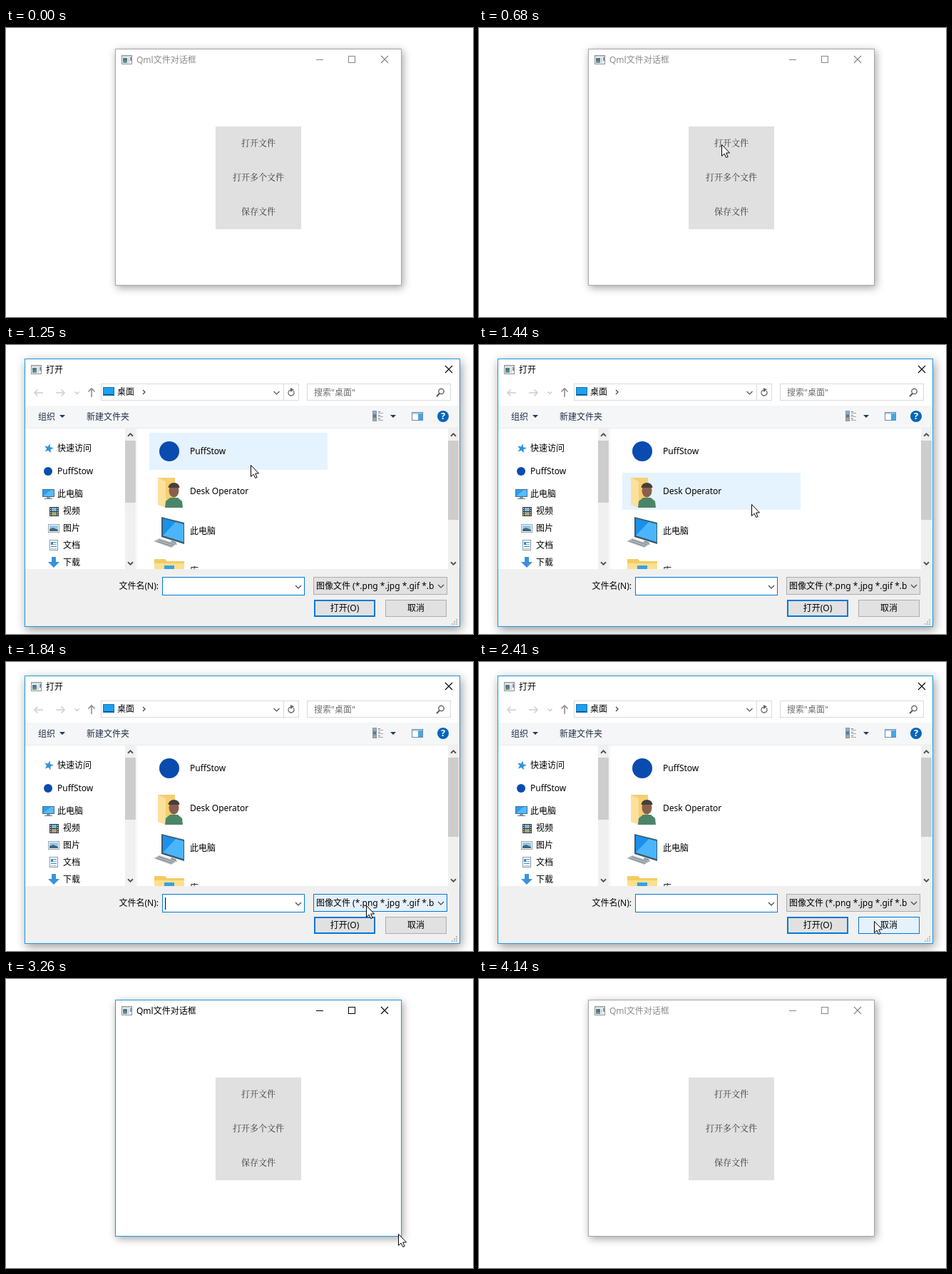
These frames come from a looping animation (655 by 405 pixels, 4190 ms). An HTML page with a canvas:

```html
<!DOCTYPE html>
<html lang="zh-CN">
<head>
<meta charset="utf-8">
<style>
html, body { margin: 0; width: 100%; height: 100%; overflow: hidden; background: #fff; }
canvas { display: block; width: 655px; height: 405px; }
</style>
</head>
<body>
<canvas id="stage"></canvas>
<script>
const W = 655, H = 405, LOOP = 4190;
const UI = "12px 'Noto Sans', 'Noto Sans CJK SC', 'Noto Sans CJK', sans-serif";
const SERIF = "500 12px 'Noto Serif CJK SC', 'Noto Sans CJK SC', 'Noto Sans CJK', serif";
const ACCENT = '#0078d7', BORDER = '#1e9ade';
const CLOUD = 'PuffStow', USER = 'Desk Operator';

const stage = document.getElementById('stage');
const layer = document.createElement('canvas');
const dpr = window.devicePixelRatio || 1;
const setup = c => {
  c.width = W * dpr;
  c.height = H * dpr;
  const ctx = c.getContext('2d');
  ctx.scale(dpr, dpr);
  return ctx;
};
const screen = setup(stage), sheet = setup(layer);
let g = screen;

// start, end, steps, from x, y, to x, y
const moves = [
  [60, 560, 8, 550, 351, 340, 163],
  [750, 750, 1, 339, 162, 339, 162],
  [1250, 1440, 4, 343, 168, 382, 223],
  [1510, 1770, 5, 404, 246, 505, 341],
  [1840, 2360, 8, 505, 341, 552, 362],
  [2410, 2740, 6, 554, 363, 561, 369],
  [3010, 3330, 6, 560, 367, 543, 351]
];

function pointer(t) {
  if (t < 60 || t >= 4140) return null;
  const [a, b, n, x0, y0, x1, y1] = moves.filter(m => m[0] <= t).pop();
  const k = n < 2 ? 0 : Math.min(n - 1, Math.floor((t - a) / (b - a) * (n - 1) + 0.001));
  const p = n < 2 ? 1 : k / (n - 1);
  return { x: Math.round(x0 + (x1 - x0) * p), y: Math.round(y0 + (y1 - y0) * p) };
}

function rect(x, y, w, h, fill) {
  g.fillStyle = fill;
  g.fillRect(x, y, w, h);
}

function box(x, y, w, h, fill, edge, lw = 1) {
  if (fill) rect(x, y, w, h, fill);
  g.strokeStyle = edge;
  g.lineWidth = lw;
  g.strokeRect(x + lw / 2, y + lw / 2, w - lw, h - lw);
}

function path(pts, close) {
  g.beginPath();
  for (let i = 0; i < pts.length; i += 2) g.lineTo(pts[i], pts[i + 1]);
  if (close) g.closePath();
}

function line(pts, color, lw = 1) {
  path(pts);
  g.strokeStyle = color;
  g.lineWidth = lw;
  g.stroke();
}

function poly(pts, fill) {
  path(pts, true);
  g.fillStyle = fill;
  g.fill();
}

function disc(x, y, r, fill) {
  g.beginPath();
  g.arc(x, y, r, 0, 7);
  g.fillStyle = fill;
  g.fill();
}

function text(s, x, cy, color = '#000', align = 'left', font = UI) {
  g.font = font;
  g.textAlign = align;
  g.fillStyle = color;
  g.fillText(s, x, cy + 4.3);
}

function cross(x, y, color) {
  line([x - 5, y - 5, x + 5, y + 5], color, 1.1);
  line([x - 5, y + 5, x + 5, y - 5], color, 1.1);
}

// d = 1 points down, -1 points up
function chevron(x, y, d, color = '#444', r = 4, lw = 1.2) {
  line([x - r, y - d * r / 2, x, y + d * r / 2, x + r, y - d * r / 2], color, lw);
}

function arrow(x, y, dx, dy, color) {
  const a = 6, b = 4.5;
  line([x - dx * a, y - dy * a, x + dx * a, y + dy * a], color, 1.6);
  line([x + dx * 1.5 - dy * b, y + dy * 1.5 - dx * b, x + dx * a, y + dy * a,
    x + dx * 1.5 + dy * b, y + dy * 1.5 + dx * b], color, 1.6);
}

function frame(x, y, w, h, edge, blur, dy, shade) {
  g.save();
  g.shadowColor = `rgba(0,0,0,${shade})`;
  g.shadowBlur = blur * dpr;
  g.shadowOffsetX = 2 * dpr;
  g.shadowOffsetY = dy * dpr;
  rect(x, y, w, h, '#fff');
  g.restore();
  box(x, y, w, h, '#fff', edge);
}

function appIcon(x, y) {
  box(x, y, 15, 13, '#f4f5f6', '#8b9298');
  rect(x + 1, y + 1, 13, 2, '#d5d9dc');
  rect(x + 2, y + 4, 6, 7, '#53788a');
  rect(x + 2, y + 8, 6, 3, '#6b9280');
  rect(x + 9, y + 4, 2, 7, '#cfd6da');
  rect(x + 12, y + 3, 2, 5, '#7d99ad');
}

function scrollbar(x, w, end) {
  rect(x, 117, w, 197, '#f0f0f0');
  rect(x, 134, w, end - 134, '#cdcdcd');
  chevron(x + w / 2, 126, -1, '#505050', 3.5, 1.8);
  chevron(x + w / 2, 306, 1, '#505050', 3.5, 1.8);
}

function monitor(x, y) {
  box(x, y, 17, 11, '#2b9df0', '#4c6f88');
  poly([x + 1, y + 10, x + 12, y + 1, x + 16, y + 1, x + 16, y + 10], '#55bcff');
  rect(x + 6, y + 11, 5, 2, '#8d9aa3');
  rect(x + 3, y + 13, 11, 1, '#667986');
}

function mainWindow(active, down) {
  const ink = active ? '#000' : '#858585';
  frame(153, 29, 402, 332, active ? BORDER : '#a6a6a6', 11, 3, 0.36);
  appIcon(162, 38);
  text('Qml文件对话框', 183, 44.5, active ? '#000' : '#8c8c8c');
  line([435, 44.5, 445, 44.5], ink);
  box(480, 39, 10, 10, null, ink);
  cross(531, 44, ink);
  rect(294, 138, 120, 144, '#e0e0e0');
  if (down) rect(294, 138, 120, 48, '#d0d0d0');
  ['打开文件', '打开多个文件', '保存文件'].forEach((s, i) =>
    text(s, 354, 162 + i * 48, '#38383a', 'center', SERIF));
}

function navigation(open) {
  arrow(46, 67, -1, 0, '#d0d0d0');
  arrow(76, 67, 1, 0, '#d0d0d0');
  chevron(99.5, 67, 1, '#c4c4c4', 3);
  arrow(120, 67, 0, -1, '#8e8e8e');
  box(133, 54, 278, 24, '#fff', '#d9d9d9');
  line([389.5, 55, 389.5, 77], '#d9d9d9');
  box(136, 59, 16, 12, '#1ca0f2', '#1673b0');
  rect(137, 69, 14, 1, '#0c4c80');
  text('桌面', 156, 66);
  if (open) line([192, 63, 195, 66, 192, 69], '#444', 1.2);
  chevron(379.5, 67, 1, '#555');
  g.beginPath();
  g.arc(400, 67, 4, -0.7, 4.4);
  g.strokeStyle = '#666';
  g.lineWidth = 1.4;
  g.stroke();
  poly([399, 60, 404, 62.5, 399, 66], '#666');
  box(422, 54, 202, 24, '#fff', '#d9d9d9');
  text('搜索"桌面"', 432, 66.5, '#6d6d6d');
  g.beginPath();
  g.arc(610.5, 65, 3.7, 0, 7);
  g.strokeStyle = '#555';
  g.lineWidth = 1.3;
  g.stroke();
  line([608, 68, 604, 72], '#555', 1.8);
}

function toolbar() {
  rect(27, 85, 609, 31, '#f5f6f7');
  rect(27, 116, 609, 1, '#e9ebec');
  text('组织', 45, 100.5, '#1e2f48');
  text('新建文件夹', 113, 100.5, '#1e2f48');
  poly([75, 98, 83, 98, 79, 102], '#1e395b');
  poly([539, 98, 547, 98, 543, 102], '#1e395b');
  for (let i = 0; i < 3; i++) {
    box(514, 92 + i * 5, 6, 5, ['#7fb6df', '#4d78a8', '#b9a481'][i], '#8998a5');
    rect(522, 93 + i * 5, 3, 1, '#777');
    rect(522, 95 + i * 5, 7, 1, '#a4a4a4');
  }
  box(569, 94, 16, 12, '#fff', '#6c8aa6');
  rect(570, 95, 14, 2, '#b9d2e7');
  rect(578, 96, 6, 9, '#48a6e4');
  disc(613, 100, 8, '#0765b8');
  text('?', 613, 100, '#fff', 'center', "bold 13px 'Noto Sans', sans-serif");
}

function star(x, y) {
  const pts = [];
  for (let i = 0; i < 10; i++) {
    const r = i % 2 ? 2.8 : 7, a = i * Math.PI / 5 - 1.35;
    pts.push(x + r * Math.cos(a), y + r * Math.sin(a));
  }
  poly(pts, '#2f94dd');
}

function folderIcons() {
  box(61, 227, 13, 13, '#333', '#333');
  rect(64, 228, 7, 5, '#78b7df');
  rect(64, 234, 7, 5, '#a2a77e');
  for (let i = 0; i < 4; i++) {
    rect(62, 228 + i * 3, 1, 2, '#eee');
    rect(72, 228 + i * 3, 1, 2, '#eee');
  }
  box(59, 251, 16, 12, '#fff', '#98a0a6');
  rect(61, 253, 12, 8, '#8fcaf0');
  poly([61, 261, 61, 258, 66, 256, 73, 259, 73, 261], '#41657a');
  box(61, 273, 12, 15, '#fff', '#8798a5');
  for (let i = 0; i < 4; i++) rect(63, 276 + i * 3, 8, 1, i % 2 ? '#8ab9dc' : '#348bcb');
  rect(63, 276, 3, 4, '#348bcb');
  poly([64, 297, 70, 297, 70, 304, 75, 304, 67, 312, 59, 304, 64, 304], '#3a92dc');
}

function sidebar(open) {
  star(60, 145);
  text('快速访问', 72, 145);
  disc(59, 177, 6, '#0a4bb0');
  text(CLOUD, 72, 177);
  monitor(51, 202);
  text('此电脑', 72, 209);
  if (open) {
    folderIcons();
    ['视频', '图片', '文档', '下载'].forEach((s, i) => text(s, 80, 233 + i * 24));
    scrollbar(167, 15, 221);
    rect(183, 117, 1, 197, '#f0f0f0');
  } else {
    box(55, 234, 12, 9, '#3ba5ee', '#47708e');
    rect(58, 245, 7, 1, '#667986');
    disc(55.5, 242.5, 4.5, '#286fae');
    line([51, 242, 60, 242], '#8fc9ef');
    text('网络', 72, 241);
    rect(185, 117, 1, 197, '#efefef');
  }
}

function userFolder() {
  poly([213, 186, 237, 186, 237, 224, 213, 224], '#f5cf72');
  poly([213, 186, 224, 191, 224, 228, 213, 224], '#fde09a');
  poly([223, 228, 224, 219, 230, 214, 241, 214, 247, 219, 248, 228], '#4b8568');
  g.beginPath();
  g.ellipse(235.5, 204, 7, 9.5, 0, 0, 7);
  g.fillStyle = '#8a604d';
  g.fill();
  g.beginPath();
  g.ellipse(235.5, 200, 8, 7, 0, Math.PI, 0);
  g.fillStyle = '#453f3c';
  g.fill();
}

function bigMonitor() {
  poly([218, 241, 250, 249, 250, 279, 218, 269], '#3f5a6b');
  poly([220, 243, 249, 251, 249, 276, 220, 267], '#1b90ea');
  poly([220, 267, 238, 248, 249, 251, 249, 276], '#4bb5fb');
  poly([232, 274, 238, 276, 240, 280, 230, 278], '#8d9aa2');
  poly([207, 275, 215, 271, 239, 279, 232, 284], '#b7bdc1');
  line([211, 275, 233, 282], '#78838a');
  line([214, 273, 236, 280], '#78838a');
}

function list(pos) {
  if (pos.x >= 201 && pos.x < 451 && pos.y >= 123 && pos.y < 314) {
    const row = Math.floor((pos.y - 123) / 56);
    if (pos.y - 123 - row * 56 < 52) rect(201, 123 + row * 56, 250, 52, '#e5f3ff');
  }
  disc(229, 149, 14, '#0a4bb0');
  userFolder();
  bigMonitor();
  poly([208, 300, 223, 300, 226, 303, 250, 303, 250, 316, 208, 316], '#f4cb63');
  rect(208, 306, 42, 9, '#fde08f');
  rect(222, 309, 14, 6, '#3ba0e2');
  [CLOUD, USER, '此电脑', '库'].forEach((s, i) => text(s, 258, 149 + i * 56));
  scrollbar(620, 15, 245);
}

function button(label, x, edge, lw, fill = '#e1e1e1') {
  box(x, 357, 86, 24, fill, edge, lw);
  text(label, x + 43, 369, '#000', 'center');
}

function footer(t, pos) {
  rect(27, 314, 609, 80, '#f0f0f0');
  text('文件名(N):', 214, 338, '#000', 'right');
  box(219, 325, 200, 26, '#fff', ACCENT);
  chevron(410, 339, 1);
  if (t < 1250 || (t >= 1840 && t < 2360)) rect(223, 330, 1, 17, '#000');

  const overType = pos.x >= 431 && pos.x < 619 && pos.y >= 325 && pos.y < 351;
  box(431, 325, 188, 25, overType ? '#e5f1fb' : '#e1e1e1', overType ? ACCENT : '#adadad');
  g.save();
  g.beginPath();
  g.rect(432, 326, 168, 23);
  g.clip();
  text('图像文件 (*.png *.jpg *.gif *.bmp)', 435, 338);
  g.restore();
  chevron(610, 338, 1);

  const down = t >= 2740;
  const over = pos.x >= 532 && pos.x < 618 && pos.y >= 357 && pos.y < 381;
  button('打开(O)', 432, down ? '#adadad' : ACCENT, down ? 1 : 2);
  if (down) button('取消', 532, '#005499', 1, '#cce4f7');
  else if (over) button('取消', 532, ACCENT, 1, '#e5f1fb');
  else button('取消', 532, '#adadad', 1);
  for (let i = 0; i < 3; i++)
    for (let j = 0; j <= i; j++) rect(631 - j * 3, 384 + i * 3, 2, 2, '#bdbdbd');
}

function dialog(t, pos) {
  const open = t >= 1000;
  frame(26, 19, 611, 376, BORDER, 13, 4, 0.4);
  appIcon(35, 28);
  text('打开', 56, 34.5);
  cross(621, 34, '#000');
  navigation(t >= 870);
  toolbar();
  g.save();
  g.beginPath();
  g.rect(27, 117, 609, 197);
  g.clip();
  sidebar(open);
  list(pos);
  g.restore();
  footer(t, pos);
}

function cursor({ x, y }) {
  g.save();
  g.translate(x + 0.5, y + 0.5);
  path([0, 0, 0, 16, 3.6, 12.6, 6.2, 18, 8.6, 17, 6.2, 11.6, 11, 11.4], true);
  g.fillStyle = '#fff';
  g.fill();
  g.strokeStyle = '#000';
  g.lineWidth = 1;
  g.stroke();
  g.restore();
}

function draw(t) {
  const pos = pointer(t);
  const active = (t >= 60 && t < 680) || (t >= 2950 && t < 4140);
  g = screen;
  rect(0, 0, W, H, '#fff');
  mainWindow(active, t >= 560 && t < 680);
  if (t >= 750 && t < 3010) {
    g = sheet;
    g.clearRect(0, 0, W, H);
    dialog(t, pos);
    g = screen;
    g.globalAlpha = t < 820 ? 0.6 : t < 2950 ? 1 : 0.4;
    g.drawImage(layer, 0, 0, W, H);
    g.globalAlpha = 1;
  }
  if (pos) cursor(pos);
}

const start = performance.now();
function tick() {
  draw((performance.now() - start) % LOOP);
  requestAnimationFrame(tick);
}
tick();
</script>
</body>
</html>
```
